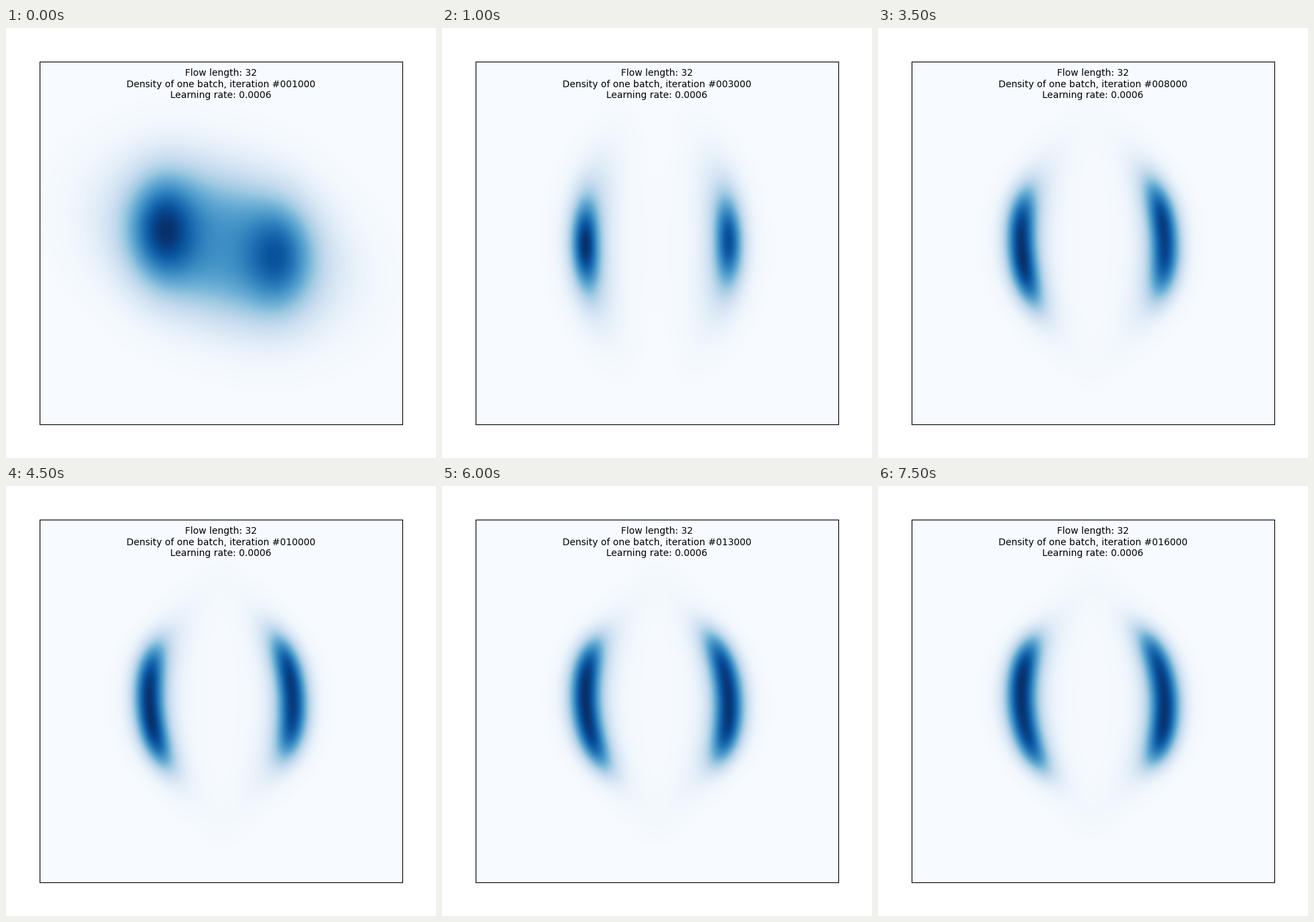
Write a matplotlib script that moves like this. It is 639 by 639 pixels and loops after 8 s.

```python
import numpy as np
import matplotlib.pyplot as plt
from matplotlib.animation import FuncAnimation

SIZE, PAD, DPI = 639, 50, 100
BOX = SIZE - 2 * PAD
FRAMES, INTERVAL = 16, 500
CX, CY, RADIUS = 319.5, 319, 107

axis = PAD + 0.5 + np.arange(BOX)
X, Y = np.meshgrid(axis, axis)


def bell(d, s):
    return np.exp(-0.5 * (d / s) ** 2)


def settle(step, tau):
    """Ease from 0 at the second step towards 1."""
    return 1 - np.exp(-max(step - 2, 0) / tau)


def cloud():
    """Wide tilted blob from which the two lobes separate."""
    dx = X - CX
    dy = Y - 322 - 0.2 * dx
    return np.exp(-np.hypot(dx / 150, dy / 112) ** 2.6)


def lobe(step, side):
    """Curved ridge (side 1 is left, -1 right) with a softer halo inside."""
    s, sway = settle(step, 6), settle(step, 2)
    merged = 0.03 ** (step - 1)

    x0 = CX - side * (RADIUS - 18 * merged)
    mid = CY + side * (5 * sway - 19 * merged)
    curve = 0.0003 + 0.0023 * s
    length = 60 + 44 * s + 20 * merged
    power = 2 + 3.4 * s**2
    tilt = side * 0.08 * np.sin(np.pi * (step - 2) / 10)

    v = Y - CY
    u = (Y - mid) / length
    ridge = x0 + 0.045 * sway * v + side * curve * v**2
    core = bell(X - ridge, 14.5 + 2 * s + 19.5 * merged)
    core *= np.exp(-np.abs(u) ** power) * np.clip(1 + tilt * u, 0, 2)

    spine = x0 + side * (8 + (curve + 0.0004) * v**2)
    halo = bell(X - spine, 25) * np.exp(-np.abs(v / 120) ** 2.5)

    soft = (0.25 - 0.08 * s) * (1 - merged)
    amp = 1 if side > 0 else 0.87 + 0.13 * s - 0.12 * merged
    return amp * ((1 - soft) * core + soft * halo)


def density(step):
    glow = 0.006 + 1.17 * 0.03 ** (step - 1)
    z = lobe(step, 1) + lobe(step, -1) + glow * cloud()
    return z / z.max()


def caption(step):
    return (f"Flow length: 32\n"
            f"Density of one batch, iteration #{step * 1000:06d}\n"
            f"Learning rate: 0.0006")


fig = plt.figure(figsize=(SIZE / DPI, SIZE / DPI), dpi=DPI, facecolor="white")
ax = fig.add_axes([PAD / SIZE, PAD / SIZE, BOX / SIZE, BOX / SIZE])
ax.set(xticks=[], yticks=[])
image = ax.imshow(density(1), cmap="Blues", vmin=0, vmax=1, aspect="auto",
                  interpolation="nearest")
label = ax.text(0.5, 0.9807, caption(1), transform=ax.transAxes, fontsize=10,
                family="DejaVu Sans", ha="center", va="top")


def update(i):
    image.set_data(density(i + 1))
    label.set_text(caption(i + 1))
    return image, label


anim = FuncAnimation(fig, update, frames=FRAMES, interval=INTERVAL,
                     repeat=True, repeat_delay=0)
plt.show()
```
